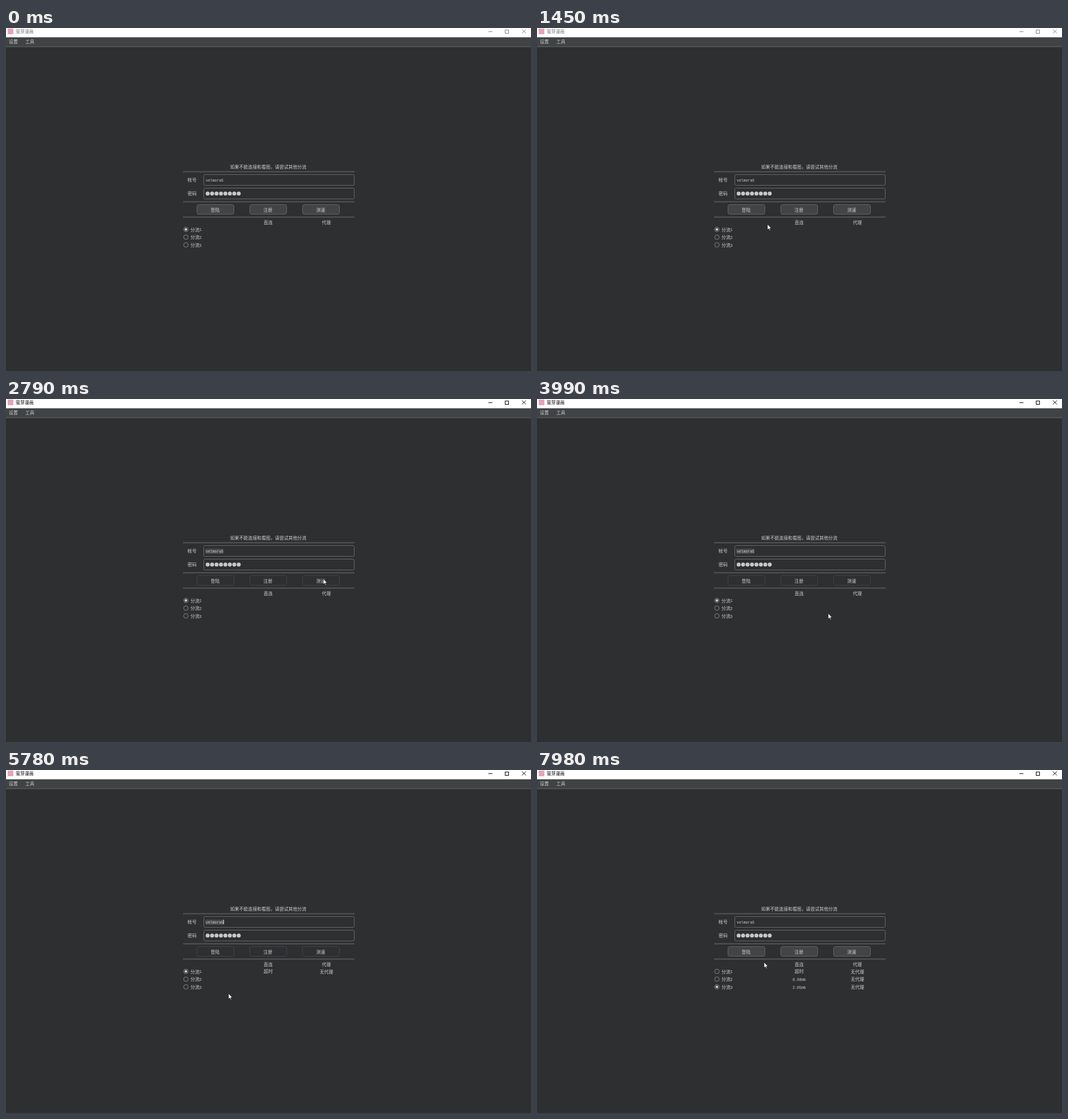
An HTML page with a canvas for the animation above (8 s loop, 925x605 px).

```html
<!DOCTYPE html>
<html lang="zh-CN">
<head>
<meta charset="utf-8">
<title>萤芽漫画</title>
<style>
  html, body { margin: 0; width: 100%; height: 100%; overflow: hidden; background: #2e2f31; }
  canvas { display: block; }
</style>
</head>
<body>
<canvas id="stage" width="925" height="605"></canvas>
<script>
const ctx = document.getElementById('stage').getContext('2d');
const LOOP = 8000, STEP = 66.5, BLINK = 530;
const BG = '#2e2f31', TEXT = '#d0d0d0', EDGE = '#68696b';
const CJK = '7.9px "Noto Sans CJK SC", "Noto Sans CJK", sans-serif';
const MONO = '6.5px "Liberation Mono", monospace';

// Moments when the interface changes state
const AT = { enter: 130, test: 2260, row1: 4250, row2: 6250, row3: 7180, pick: 7510 };

// Pointer moves, each easing out from the previous stop
const ENTRY = { x: 876, y: 579 };
const MOVES = [
  { start: 130, end: 590, x: 470, y: 443 },
  { start: 790, end: 1464, x: 406, y: 346 },
  { start: 1464, end: 1590, x: 348, y: 312 },
  { start: 1650, end: 2200, x: 559, y: 317 },
  { start: 3190, end: 3930, x: 513, y: 378 },
  { start: 4580, end: 4920, x: 497, y: 380 },
  { start: 5180, end: 5980, x: 381, y: 396 },
  { start: 6050, end: 6510, x: 363, y: 392 },
  { start: 6790, end: 7310, x: 318, y: 382 },
  { start: 7640, end: 7980, x: 400, y: 339 }
];

const easeOut = u => 1 - Math.pow(1 - u, 1.65);

function pointerAt(t) {
  let { x, y } = ENTRY;
  for (const m of MOVES) {
    if (t < m.start) break;
    const k = easeOut(Math.min(1, (t - m.start) / (m.end - m.start)));
    x += (m.x - x) * k;
    y += (m.y - y) * k;
  }
  return [Math.round(x), Math.round(y)];
}

function rect(x, y, w, h, color) {
  ctx.fillStyle = color;
  ctx.fillRect(x, y, w, h);
}

function text(str, x, y, { align = 'left', color = TEXT, font = CJK } = {}) {
  ctx.font = font;
  ctx.textAlign = align;
  ctx.fillStyle = color;
  ctx.fillText(str, x, y);
}

function box(x, y, w, h, r, fill, stroke) {
  ctx.beginPath();
  ctx.roundRect(x + .5, y + .5, w - 1, h - 1, r);
  ctx.fillStyle = fill;
  ctx.fill();
  ctx.lineWidth = 1;
  ctx.strokeStyle = stroke;
  ctx.stroke();
}

function circle(x, y, r) {
  ctx.beginPath();
  ctx.arc(x, y, r, 0, Math.PI * 2);
}

function disc(x, y, r, color) {
  circle(x, y, r);
  ctx.fillStyle = color;
  ctx.fill();
}

function titleBar(active) {
  rect(0, 0, 925, 16, '#fff');
  rect(3, 1, 10, 10, '#e5a4ba');
  text('萤芽漫画', 17, 9, { color: active ? '#000' : '#757575' });
  ctx.strokeStyle = active ? '#000' : '#858585';
  ctx.lineWidth = 1;
  ctx.beginPath();
  ctx.moveTo(850, 6.5); ctx.lineTo(857, 6.5);
  ctx.moveTo(909, 2.5); ctx.lineTo(916, 9.5);
  ctx.moveTo(916, 2.5); ctx.lineTo(909, 9.5);
  ctx.stroke();
  ctx.strokeRect(879.5, 3.5, 6, 6);
}

function menuBar() {
  rect(0, 16, 925, 17, '#404244');
  rect(0, 16, 925, 1, '#8a8b8c');
  rect(0, 32.5, 925, 1, EDGE);
  text('设置', 5, 27);
  text('工具', 34, 27);
}

function form(selected, caret) {
  text('如果不能连接和看图，请尝试其他分流', 462, 248, { align: 'center' });
  for (const y of [253, 306, 333]) rect(312, y - .5, 302, 2, '#545557');
  text('帐号', 320, 271);
  text('密码', 320, 295);
  box(348, 258, 266, 20, 2, BG, EDGE);
  box(348, 282, 266, 20, 2, BG, EDGE);
  if (selected) rect(351, 264, 32, 9, '#494b4d');
  text('velmora5', 352, 271, { font: MONO });
  if (caret) rect(383, 264, 1, 8, '#e0e0e0');
  for (let i = 0; i < 8; i++) disc(355.3 + i * 7.82, 292, 3.5, '#c8c8c8');
}

function buttons(enabled) {
  ['登陆', '注册', '测速'].forEach((label, i) => {
    const x = 336 + i * 93;
    box(x, 311, 66, 18, 3, enabled ? '#424446' : BG, enabled ? '#626467' : '#424447');
    text(label, x + 32.5, 323.5, { align: 'center' });
  });
}

function routes(t) {
  text('直连', 462, 346, { align: 'center' });
  text('代理', 564.5, 346, { align: 'center' });
  const picked = t >= AT.pick ? 2 : 0;
  [['超时', AT.row1], ['0.98mb', AT.row2], ['2.05mb', AT.row3]].forEach(([speed, shown], i) => {
    const y = 355.3 + i * 13.6;
    circle(317, y, 4);
    ctx.lineWidth = 1;
    ctx.strokeStyle = '#858688';
    ctx.stroke();
    if (i === picked) disc(317, y, 2.2, TEXT);
    text('分流', 325, y + 3.2);
    text(String(i + 1), 340.8, y + 3, { font: MONO });
    if (t < shown) return;
    text(speed, 462, y + 3, { align: 'center', font: i ? MONO : CJK });
    text('无代理', 564.5, y + 3.2, { align: 'center' });
  });
}

function pointer(x, y) {
  ctx.save();
  ctx.translate(x, y);
  ctx.beginPath();
  ctx.moveTo(0, 0);
  ctx.lineTo(0, 10);
  ctx.lineTo(2.3, 8);
  ctx.lineTo(4, 11.6);
  ctx.lineTo(5.4, 11);
  ctx.lineTo(3.9, 7.5);
  ctx.lineTo(6.8, 7.2);
  ctx.closePath();
  ctx.lineWidth = .8;
  ctx.fillStyle = '#fff';
  ctx.fill();
  ctx.strokeStyle = '#18191a';
  ctx.stroke();
  ctx.restore();
}

function draw(t) {
  const active = t >= AT.test;
  const selected = active && t < AT.pick;
  const caret = selected && Math.floor((t - AT.test) / BLINK) % 2 === 0;
  rect(0, 0, 925, 605, BG);
  titleBar(active);
  menuBar();
  form(selected, caret);
  buttons(!active || t >= AT.row3);
  routes(t);
  if (t >= AT.enter) pointer(...pointerAt(t));
}

function frame() {
  const t = performance.now() % LOOP;
  draw(Math.floor((t + 14) / STEP) * STEP);
  requestAnimationFrame(frame);
}
frame();
</script>
</body>
</html>
```
